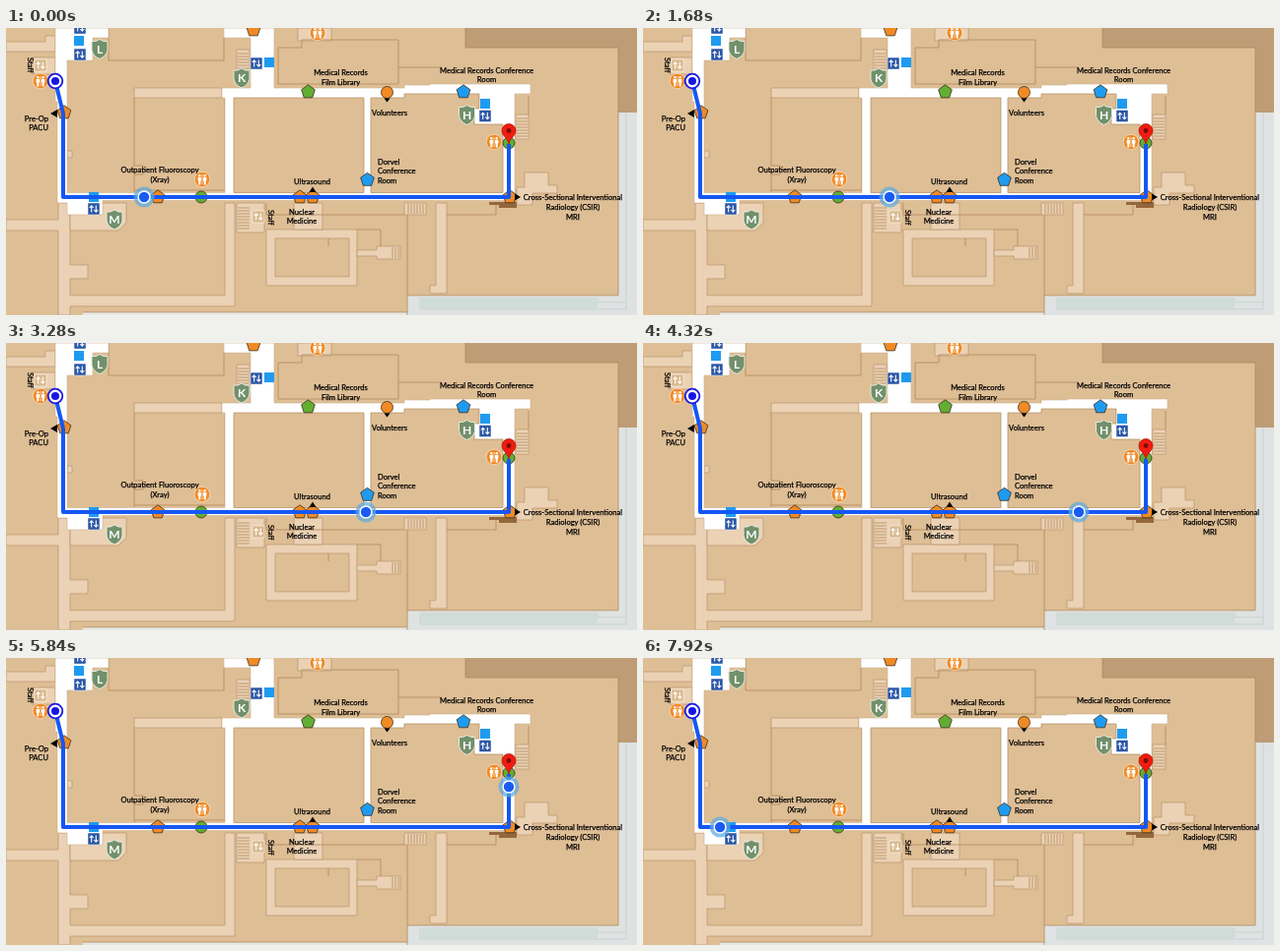
An HTML page that plays this animation: 640 by 292 pixels, repeating every 8 s.

```html
<!DOCTYPE html>
<html lang="en">
<head>
<meta charset="utf-8">
<title>Indoor route</title>
<style>
html, body { margin: 0; width: 100%; height: 100%; overflow: hidden; background: #debe95; }
svg { display: block; width: 100vw; height: 100vh; }
text { font: 7.6px Lato, "Open Sans", sans-serif; fill: #000; stroke: #000; stroke-width: .25; }
.letter { font: bold 12px Lato, sans-serif; fill: #fff; stroke: none; }
.wall { fill: none; stroke: #b08a5a; stroke-width: .8; }
.hall { fill: #ebd2b5; stroke: #b9946a; stroke-width: .7; fill-rule: evenodd; }
.white { fill: #fff; stroke: #cdb08a; stroke-width: .6; }
.room { fill: #debe95; stroke: #b08a5a; stroke-width: .7; }
</style>
</head>
<body>
<svg id="stage" viewBox="0 0 640 292" preserveAspectRatio="none">
  <rect width="640" height="292" fill="#debe95"/>
  <path d="M466 0H640V86H621V20H466Z" fill="#bd9c76"/>
  <path d="M621 86H640V292H407V272H621Z" fill="#dfe2e2"/>
  <path d="M629 86V286H420V275H600V279H629" fill="none" stroke="#c5d3ce" stroke-width="1"/>
  <path d="M420 275H600V285H420Z" fill="#d0dcd7"/>
  <path d="M78 289H407V292H78Z" fill="#e6e7e4"/>
  <path class="wall" d="M466 0V20H621V272H407V292M78 289H407"/>

  <g id="halls"></g>
  <g id="walls"></g>
  <g id="floors"></g>
  <path d="M490 180V177H518V183H500V180Z" fill="#93673c"/>
  <g id="icons"></g>
  <g id="labels"></g>

  <path id="route" d="M50 54L58 87V172H510V118" fill="none" stroke="#1557f4" stroke-width="4" stroke-linejoin="round"/>
  <circle cx="50" cy="54" r="7.300" fill="#fff" stroke="#1616e4" stroke-width="1.800"/>
  <circle cx="50" cy="54" r="4" fill="#1616e4"/>
  <g id="marker">
    <circle r="10.500" fill="#5aaae0" fill-opacity=".7"/>
    <circle r="6.700" fill="#fff"/>
    <circle r="5.200" fill="#1a5cf2"/>
  </g>
  <path d="M510 118C509 112 503 110 503 104.500A7 7 0 0 1 517 104.500C517 110 511 112 510 118Z" fill="#f01c10" stroke="#a8120a" stroke-width=".7"/>
  <circle cx="510" cy="104.500" r="2.400" fill="#7c0d08"/>
</svg>
<script>
const NS = "http://www.w3.org/2000/svg";
const byId = id => document.getElementById(id);

function add(parent, tag, attrs, text) {
  const el = document.createElementNS(NS, tag);
  for (const key in attrs) el.setAttribute(key, attrs[key]);
  if (text) el.textContent = text;
  byId(parent).append(el);
  return el;
}

const shape = (parent, cls, d) => add(parent, "path", { class: cls, d });

// Beige passages and stairwells
[
  "M0 195H53V178H65V241H83V255H65V272H222V178H232V283H65V292H53V206H0Z",
  "M65 178H122V198L114 206H65Z",
  "M130 61H219V71H130Z",
  "M234 178H262V208H234Z",
  "M264 205H356V262H264ZM273 214V253H348V214Z",
  "M292 178H321V205H292Z",
  "M356 226H376V222H400V235H376V232H356Z",
  "M404 178H426V190H404Z",
  "M436 178H447V270H430V262H436Z",
  "M518 180V162H526V147H550V160H559V168H534V180Z",
  "M517 88H530V113H517Z",
  "M27 30H50V47H27Z",
  "M0 14H40V8H50V24H0Z",
  "M62 125H67V132H62Z",
  "M234 22H247V45H234Z",
  "M296 0H330V13H296Z"
].forEach(d => shape("halls", "hall", d));

// Room outlines
[
  "M130 71V140H139V149H130V167M222 72V165H130",
  "M300 12H398V57H276V20H300Z",
  "M376 79H436V70M430 70V80H474",
  "M104 0V33H221V10",
  "M370 149H400V118H376V116H370",
  "M264 178V190H404M407 190V272",
  "M447 190H497V180M356 205H380V222M327 214V222",
  "M398 40H442M530 69V88"
].forEach(d => shape("walls", "wall", d));

function stairs(x, y, w, h, across) {
  const size = across ? w : h;
  for (let i = 3; i < size; i += 3)
    shape("walls", "wall", across ? `M${x + i} ${y}v${h}` : `M${x} ${y + i}h${w}`);
}

stairs(518, 89, 11, 23);
stairs(235, 23, 11, 22);
stairs(235, 180, 12, 27);
stairs(389, 223, 10, 11, true);
stairs(405, 179, 20, 10, true);

// White corridors, then the rooms they enclose
[
  "M50 0H104V10H88V33H62V167.500H222V71H219V61H248V10H221V0H272V61H404V58H430V57H532V67H516V175.500H98V190H62V178H52V75H50Z"
].forEach(d => shape("floors", "white", d));
[
  "M231 71V167.500H363V71Z",
  "M370 71V167.500H504V98H475V82H480V67H404V71Z"
].forEach(d => shape("floors", "room", d));

const ORANGE = "#f08a24", BLUE = "#1e9bf0", GREEN = "#62ad32", EDGE = "#3a2c1c";

function pentagon(x, y, fill) {
  const points = [0, 1, 2, 3, 4].map(i => {
    const a = (i * 72 - 90) * Math.PI / 180;
    return `${x + 7.2 * Math.cos(a)},${y + 7.2 * Math.sin(a)}`;
  }).join(" ");
  add("icons", "polygon", { points, fill, stroke: EDGE, "stroke-width": .8 });
}

function dot(x, y, fill) {
  add("icons", "circle", { cx: x, cy: y, r: 6, fill, stroke: EDGE, "stroke-width": .8 });
}

function square(x, y) {
  add("icons", "rect", { x: x - 5, y: y - 5, width: 10, height: 10, fill: BLUE });
}

function lift(x, y, fill = "#2c57a6") {
  add("icons", "rect", { x: x - 6, y: y - 6, width: 12, height: 12, fill, stroke: "#fff", "stroke-width": .5 });
  add("icons", "path", {
    d: `M${x - 2.3} ${y + 3.5}V${y - 3}m-2 2l2-2.200l2 2.200M${x + 2.3} ${y - 3.5}V${y + 3}m-2-2l2 2.200l2-2.200`,
    fill: "none", stroke: "#fff", "stroke-width": 1.1
  });
}

function restroom(x, y) {
  add("icons", "circle", { cx: x, cy: y, r: 7.8, fill: ORANGE, stroke: "#fff", "stroke-width": .5 });
  for (const dx of [-2.7, 2.7]) {
    add("icons", "circle", { cx: x + dx, cy: y - 3.7, r: 1.2, fill: "#fff" });
    add("icons", "path", { d: `M${x + dx - 1.7} ${y - 2}h3.400v3.500h-.7v4h-2v-4h-.7Z`, fill: "#fff" });
  }
  add("icons", "path", { d: `M${x} ${y - 5}v10`, stroke: "#fff", "stroke-width": .6 });
}

function shield(x, y, letter) {
  add("icons", "path", {
    d: `M${x - 8} ${y - 8}Q${x - 4} ${y - 7} ${x} ${y - 10}Q${x + 4} ${y - 7} ${x + 8} ${y - 8}V${y + 1}Q${x + 7} ${y + 7} ${x} ${y + 10}Q${x - 7} ${y + 7} ${x - 8} ${y + 1}Z`,
    fill: "#71906b", stroke: "#e6eadd", "stroke-width": 1
  });
  add("icons", "text", { class: "letter", x, y: y + 4, "text-anchor": "middle" }, letter);
}

const arrow = d => add("icons", "path", { d, fill: "#000" });

for (const [x, y] of [[59, 86], [154, 172], [298, 172], [311, 172], [511, 172], [251, 2]]) pentagon(x, y, ORANGE);
pentagon(464, 65, BLUE);
pentagon(366.5, 154.5, BLUE);
pentagon(306.5, 65, GREEN);
dot(386.5, 65.5, ORANGE);
dot(198, 172, GREEN);
dot(510, 117, GREEN);
for (const [x, y] of [[74, 13], [267, 35], [486, 77], [89, 172]]) square(x, y);
for (const [x, y] of [[75, 0], [75, 27], [254, 36], [486, 89.5], [89, 184]]) lift(x, y);
lift(35, 38, "#d9b98c");
lift(256, 192, "#d9b98c");
for (const [x, y] of [[35, 54], [199, 154], [316, 5], [495, 116]]) restroom(x, y);
shield(95, 21.5, "L");
shield(239, 51, "K");
shield(467.5, 88.5, "H");
shield(110, 195, "M");
["M45 87l7-4v8Z", "M522 172l-6-3.500v7Z", "M311 161.500l-3.500 5.500h7Z", "M386.500 75.500l-3-4h6Z"].forEach(arrow);

function label(x, y, lines, anchor = "middle", step = 10) {
  lines.forEach((line, i) =>
    add("labels", "text", { x, y: y + i * step, "text-anchor": anchor }, line));
}

label(156, 146.5, ["Outpatient Fluoroscopy", "(Xray)"]);
label(339.5, 48, ["Medical Records", "Film Library"]);
label(487.5, 46, ["Medical Records Conference", "Room"], "middle", 9);
label(389, 88.5, ["Volunteers"]);
label(377, 138.5, ["Dorvel", "Conference", "Room"], "start", 9.7);
label(310.5, 158.5, ["Ultrasound"]);
label(300, 189.7, ["Nuclear", "Medicine"], "middle", 9.7);
label(43, 94.5, ["Pre-Op", "PACU"], "end", 9.7);
label(575, 175.3, ["Cross-Sectional Interventional", "Radiology (CSIR)", "MRI"], "middle", 9.7);
for (const [x, y] of [[21.5, 30], [265.5, 185]])
  add("labels", "text", { transform: `translate(${x} ${y}) rotate(90)` }, "Staff");

// Time and distance along the route; the marker restarts after reaching the pin
const LOOP = 8000, STEP = 80, RESTART = 6020;
const outbound = [[0, 201], [1680, 311], [3280, 426], [4320, 503], [5840, 612], [RESTART, 625]];
const again = [[RESTART, 0], [7120, 80], [LOOP, 145]];

function distance(t) {
  const keys = t < RESTART ? outbound : again;
  const i = keys.findIndex(key => key[0] > t);
  const [t0, d0] = keys[i - 1], [t1, d1] = keys[i];
  return d0 + (d1 - d0) * (t - t0) / (t1 - t0);
}

const route = byId("route"), marker = byId("marker");

function draw(t) {
  const p = route.getPointAtLength(distance(t));
  marker.setAttribute("transform", `translate(${p.x} ${p.y})`);
}

let start;
function tick(now) {
  start ??= now;
  draw(Math.floor(((now - start) % LOOP) / STEP) * STEP);
  requestAnimationFrame(tick);
}
draw(0);
requestAnimationFrame(tick);
</script>
</body>
</html>
```
